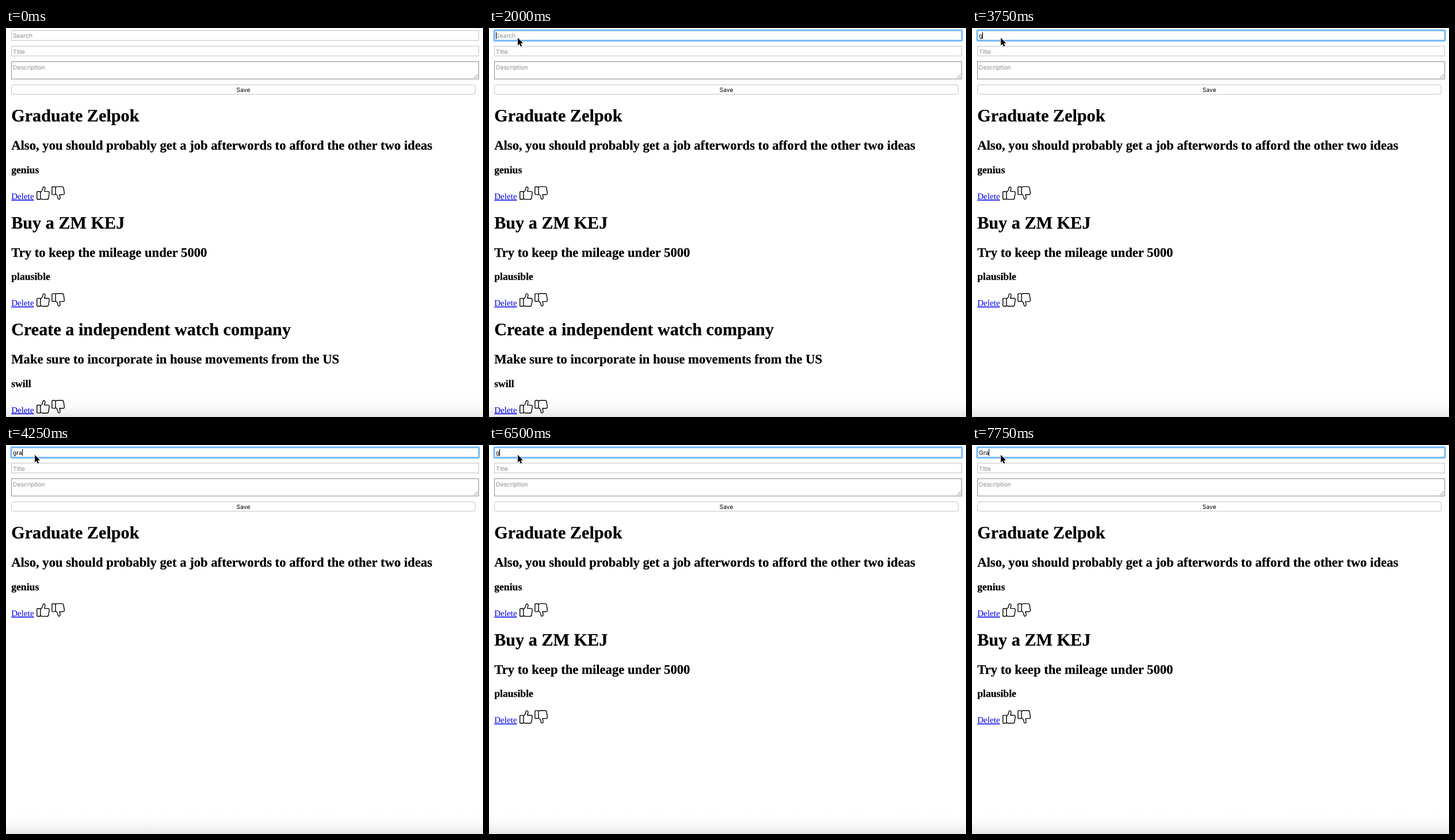
Recreate the animation shown at these times as an HTML page. Size 829 by 675 pixels, loop 8000 ms.

```html
<!DOCTYPE html>
<html lang="en">
<head>
<meta charset="utf-8">
<title>Idea list</title>
<style>
  html, body { margin: 0; width: 100%; height: 100%; overflow: hidden; background: #fff; }
  svg { display: block; width: 829px; height: 675px; }
  text { white-space: pre; text-rendering: geometricPrecision; }
  .ui { font: 10.3px Inter, "Open Sans", sans-serif; }
  .hint { fill: #a0a0a0; stroke: #a0a0a0; stroke-width: .2px; }
  .idea { font-family: "Liberation Serif", "Noto Serif", serif; font-size: 15.1px; }
  .h1, .h2, .h3 { font-weight: bold; stroke: #000; stroke-width: .25px; }
  .h1 { font-size: 30.2px; }
  .h2 { font-size: 22.66px; }
  .h3 { font-size: 17.67px; }
  .link { fill: #0000ee; text-decoration: underline; }
  .box { fill: #fff; stroke: #c2c2c2; }
  .ring { fill: none; stroke: #6fb4f5; }
</style>
</head>
<body>
<svg viewBox="0 0 829 675">
  <defs>
    <linearGradient id="shade" x2="0" y2="1">
      <stop offset="0" stop-color="#fff"/>
      <stop offset=".5" stop-color="#fafafa"/>
      <stop offset="1" stop-color="#e9e9e9"/>
    </linearGradient>
    <g id="thumb" fill="none" stroke="#000" stroke-width="1.4" stroke-linejoin="round">
      <rect x=".7" y="8.7" width="6.2" height="13.6" rx="1.2"/>
      <path d="M6.9 10C9 8.5 10.5 6.5 10.9 4.2L11.3 1.8C11.6 .3 14.6 .2 14.9 2.6C15 4.6 14.4 6.6 13.8 8.6H19.8C21.6 8.6 22.4 9.8 22.2 11.4L20.9 20C20.6 21.6 19.8 22.4 18.2 22.4H10.5C9 22.4 8 21.9 6.9 21.2"/>
    </g>
  </defs>
  <rect y="638" width="829" height="37" fill="url(#shade)"/>

  <g class="ui">
    <rect class="box" x="9.5" y="4.5" width="812" height="17"/>
    <g id="focus">
      <rect class="ring" x="9" y="4" width="813" height="18" rx="1.5" stroke-width="4" opacity=".45"/>
      <rect class="ring" x="9" y="4" width="813" height="18" rx="1" stroke-width="1.8"/>
    </g>
    <text id="query" x="12" y="17"></text>
    <rect id="caret" y="7" width="1" height="12"/>

    <rect class="box" x="9.5" y="31.5" width="812" height="17"/>
    <text class="hint" x="12" y="44.5">Title</text>

    <rect class="box" x="9.5" y="58.5" width="812" height="30" style="stroke:#8c8c8c"/>
    <path d="M813 87l7-7M817 87l3-3" stroke="#777" stroke-width=".9"/>
    <text class="hint" x="12" y="72">Description</text>

    <rect class="box" x="9.5" y="98.5" width="806" height="16.5" rx="4"/>
    <text x="412.5" y="110.6" text-anchor="middle">Save</text>
  </g>

  <g id="list" class="idea"></g>

  <path id="pointer" d="M0 0V13.2L3 10.4L5.1 15.2L7.2 14.3L5.2 9.6H9.2Z" stroke="#fff" stroke-width="1.2" paint-order="stroke"/>
</svg>
<script>
const LOOP = 8000, STEP = 185.4;
const $ = id => document.getElementById(id);

const ideas = [
  ["Graduate Zelpok", "Also, you should probably get a job afterwords to afford the other two ideas", "genius"],
  ["Buy a ZM KEJ", "Try to keep the mileage under 5000", "plausible"],
  ["Create a independent watch company", "Make sure to incorporate in house movements from the US", "swill"]
];

$("list").innerHTML = ideas.map(([title, body, quality], i) => `
  <g transform="translate(9.2 ${i * STEP})">
    <text class="h1" y="162.3">${title}</text>
    <text class="h2" y="211.3">${body}</text>
    <text class="h3" y="252">${quality}</text>
    <text class="link" y="296.9">Delete</text>
    <use href="#thumb" x="43.8" y="275"/>
    <use href="#thumb" transform="translate(70 297.8) scale(1 -1)"/>
  </g>`).join("");
const cards = [...$("list").children];

// [start ms, x, y]
const moves = [
  [0, -50, -50], [250, 433.7, 113.7], [500, 266.7, 122.7], [750, 241.7, 122.7],
  [1000, 52, 24], [1250, 49.2, 16], [1500, 50, 17]
];

// [start ms, typed text, caret shown, ideas shown]
const states = [
  [0, "", 0, 3], [2000, "", 1, 3], [2500, "", 0, 3], [3000, "", 1, 3], [3500, "", 0, 3],
  [3750, "g", 1, 2], [4250, "gra", 1, 1], [4500, "grad", 1, 1], [5000, "grad", 0, 1],
  [5500, "grad", 1, 1], [6000, "gra", 1, 1], [6250, "gr", 1, 2], [6500, "g", 1, 2],
  [7000, "", 1, 3], [7250, "G", 1, 2], [7750, "Gra", 1, 2]
];

const at = (rows, t) => rows.findLast(row => row[0] <= t);
const show = (el, on) => el.setAttribute("visibility", on ? "visible" : "hidden");

function draw(now) {
  const t = now % LOOP;
  const [, x, y] = at(moves, t);
  const [, typed, caret, count] = at(states, t);
  const query = $("query");

  query.textContent = typed || "Search";
  query.setAttribute("class", typed ? "" : "hint");
  const end = typed ? Math.round(12 + query.getComputedTextLength()) : 12;
  $("caret").setAttribute("x", end);
  show($("caret"), caret);
  show($("focus"), t >= 2000);
  cards.forEach((card, i) => show(card, i < count));
  $("pointer").setAttribute("transform", `translate(${x} ${y})`);
}

const start = performance.now();
function tick() {
  draw(performance.now() - start);
  requestAnimationFrame(tick);
}
tick();
</script>
</body>
</html>
```
